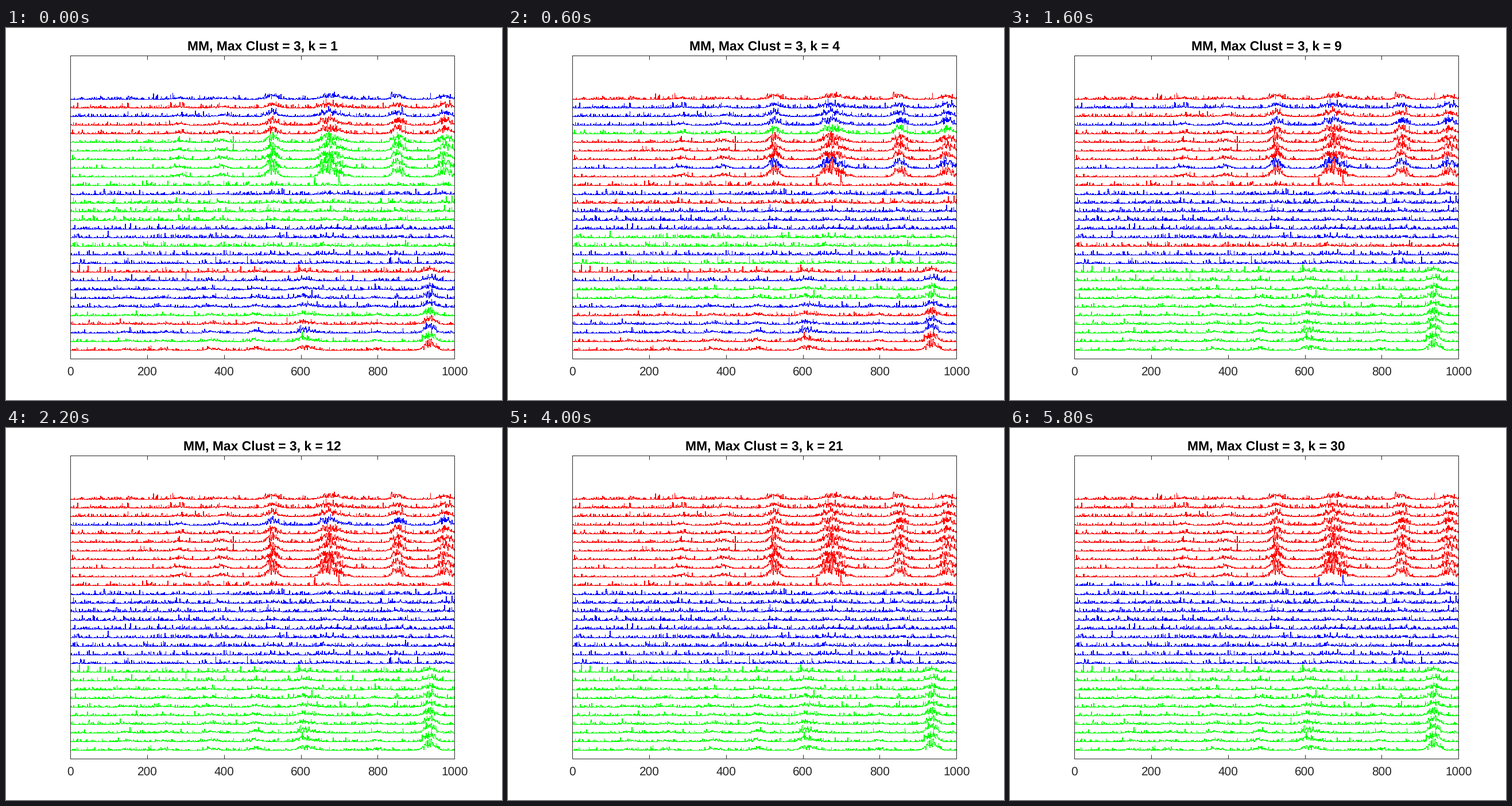
Write a matplotlib script that moves like this. It is 864 px wide and 648 px high and loops after 6000 ms.

```python
import numpy as np
import matplotlib.pyplot as plt
from matplotlib.animation import FuncAnimation

DPI = 150
W, H = 864, 648
LEFT, TOP, RIGHT, BOTTOM = 112.2, 48.2, 781.2, 576.2
FRAMES, INTERVAL = 30, 200
COLORS = {"R": "#ff0000", "G": "#00ff00", "B": "#0000ff"}

plt.rcParams.update({
    "font.family": "Liberation Sans",
    "text.hinting": "none",
    "path.simplify": False,
})

# Clusters from top to bottom: initial guess, regrouping, solution.
GUESS = "BRBRRGGGGG" "GBGGGBBGBB" "RBBBBGRBGR"
REGROUP = "RBBBGRRRBR" "RBRBBBGGBG" "RBGGBRBBRR"
FINAL = "R" * 10 + "B" * 10 + "G" * 10
# Traces that sit in the wrong cluster until the given step.
LATE = {2: 8, 4: 8, 12: 8, 8: 11, 17: 11, 1: 12, 3: 17, 10: 23}

# Bursts (centre, height) of the two source signals.
UPPER = [(282, 0.35), (393, 0.4), (525, 1.2), (662, 1.1),
         (687, 0.9), (715, 0.25), (852, 1.2), (974, 1.25)]
LOWER = [(145, 0.15), (245, 0.15), (368, 0.25), (482, 0.35),
         (606, 0.6), (635, 0.2), (795, 0.2), (935, 1.15)]

x = np.arange(1, 1001)
rng = np.random.default_rng(7)


def envelope(bursts, width=13):
    return sum(h * np.exp(-0.5 * ((x - c) / width) ** 2) for c, h in bursts)


def make_trace(level):
    """Bursts fade and hiss grows with the place inside a group of ten."""
    group, place = divmod(level - 1, 10)
    fade = place / 9
    signal = envelope(UPPER if group else LOWER)
    gain = 0.1 if group == 1 else 1 - 0.6 * fade
    noise = 0.13 if group == 1 else 0.08 + 0.04 * fade
    burst = gain * signal * np.clip(rng.normal(0.75, 0.3, x.size), 0.1, 1.5)
    hiss = noise * np.maximum(rng.laplace(size=x.size), 0)
    return level + burst + hiss


def cluster(i, k):
    """Cluster of trace i (0 = top) at step k; the changes are staggered."""
    if k < 2 + i % 3:
        return GUESS[i]
    if k < 5 + i % 2:
        return REGROUP[i]
    if k < LATE.get(i, 0):
        return "B" if i < 10 else "R"
    return FINAL[i]


fig = plt.figure(figsize=(W / DPI, H / DPI), dpi=DPI, facecolor="white")
ax = fig.add_axes([LEFT / W, 1 - BOTTOM / H,
                   (RIGHT - LEFT) / W, (BOTTOM - TOP) / H])
ax.set(xlim=(0, 1000), ylim=(0, 35), xticks=range(0, 1001, 200), yticks=[])
ax.tick_params(direction="in", top=True, length=3.2, width=0.48, pad=13.5,
               labelsize=10, color="#262626", labelcolor="#262626")
for label in ax.get_xticklabels():
    label.set_va("baseline")
for spine in ax.spines.values():
    spine.set(linewidth=0.48, color="#262626")

# Steps snapped to the pixel grid give crisp one-pixel strokes.
lines = [ax.plot(x, make_trace(level), lw=0.48, drawstyle="steps-mid",
                 antialiased=False, snap=True, solid_joinstyle="miter",
                 solid_capstyle="butt")[0]
         for level in range(1, 31)]
lines.reverse()
title = fig.text((LEFT + RIGHT) / 2 / W, 1 - 39 / H, "", size=11,
                 weight="bold", ha="center", va="baseline")


def update(frame):
    k = frame + 1
    for i, line in enumerate(lines):
        line.set_color(COLORS[cluster(i, k)])
    title.set_text(f"MM, Max Clust = 3, k = {k}")
    return [*lines, title]


anim = FuncAnimation(fig, update, frames=FRAMES, interval=INTERVAL,
                     repeat=True, repeat_delay=0, blit=False)
plt.show()
```
